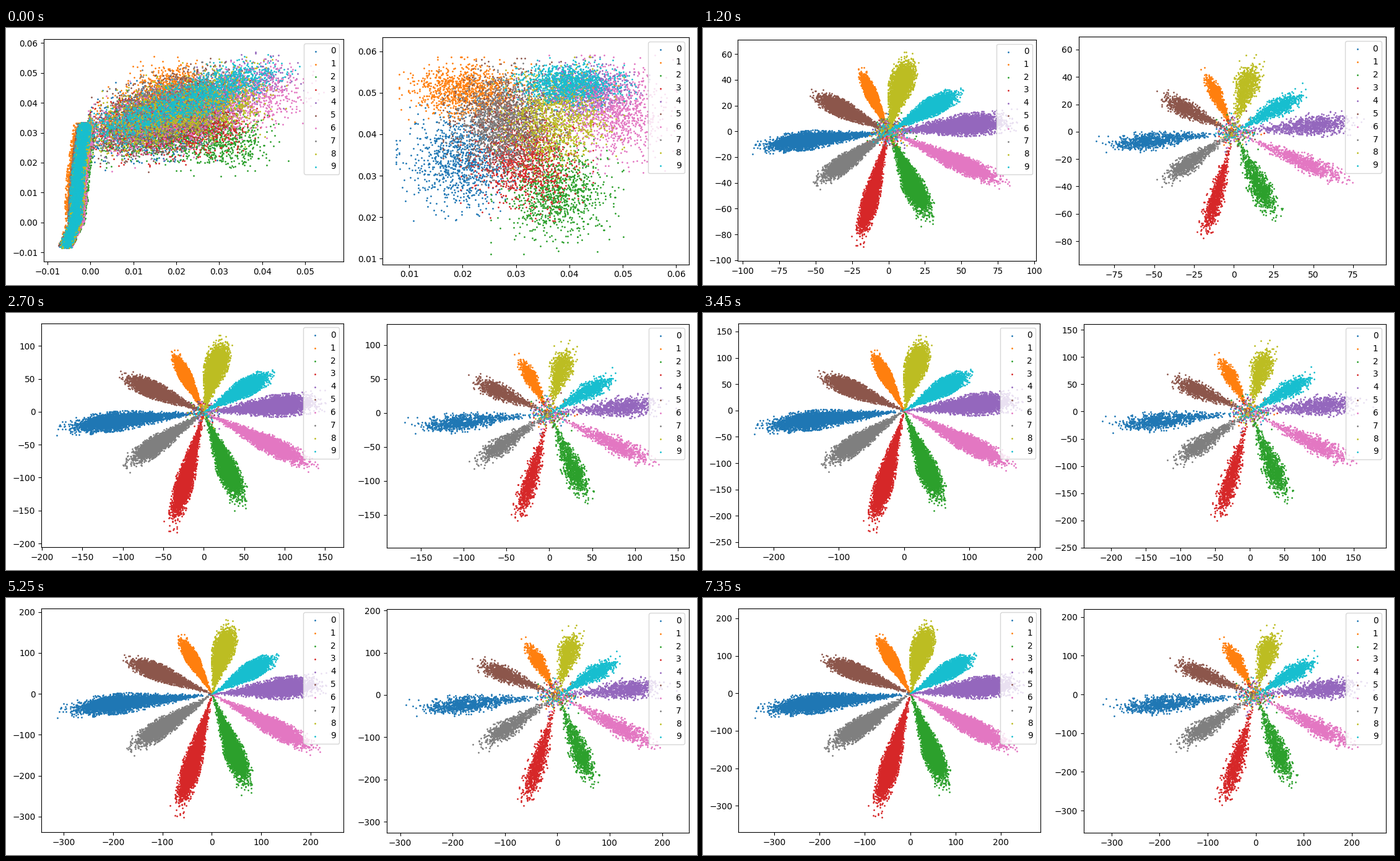
Recreate the animation shown at these times as a matplotlib script. Size 1116x416 px, loop 7.5 s.

```python
import numpy as np
import matplotlib.pyplot as plt
from matplotlib.animation import FuncAnimation

W, H, DPI = 1116, 416, 100
FRAMES, STEP = 50, 150
EM = 10 * DPI / 72

# Trained rays, one per class: end point and half width
RAYS = np.array([(-320, -40, 22), (-68, 144, 12), (76, -246, 19),
                 (-72, -303, 18), (238, 25, 24), (-184, 89, 18),
                 (218, -143, 20), (-172, -138, 20), (38, 180, 20),
                 (132, 97, 18)])

# First-epoch cluster centres, one per class
CLUSTERS = np.array([(.020, .034), (.0205, .0506), (.0377, .026),
                     (.032, .034), (.0425, .0505), (.0288, .0435),
                     (.048, .0448), (.028, .0425), (.0378, .044),
                     (.040, .0522)])

# Axis limits as rows of low and high (x, y)
TRAIN = {"first": np.array([(-.01086, -.0131), (.0589, .0613)]),
         "last": np.array([(-379, -371), (287, 227)])}
TEST = {"first": np.array([(.00502, .0086), (.0624, .0634)]),
        "last": np.array([(-358, -358), (271, 221)])}

# Growth of the features towards their last size, along x and y
GROW_AT = (0, 8, 13, 23, 30, 41, 49)
GROW_X = (.02, .272, .39, .67, .857, .974, 1)
GROW_Y = (.02, .2715, .41, .70, .862, .974, 1)


def scaled(pts, k):
    """Shrink last-epoch points to epoch k; positive sides grow earlier."""
    grow = np.array([np.interp(k, GROW_AT, g) for g in (GROW_X, GROW_Y)])
    return pts * np.where(pts < 0, grow, grow ** (.8, .89))


def text_width(text):
    em = {"\u2212": .838, ".": .318}
    return EM * sum(em.get(ch, .636) for ch in text)


def shown_ticks(axis, lo, hi):
    ticks = [t for t in axis.get_majorticklocs() if lo <= t <= hi]
    return ticks, axis.get_major_formatter().format_ticks(ticks)


class Panel:
    def __init__(self, fig, edge, middle, limits, count, seed):
        self.edge, self.middle, self.limits = edge, middle, limits
        self.train = limits is TRAIN
        self.ax = fig.add_axes([.1, .1, .3, .8])
        self.rng = np.random.default_rng(seed)
        self.count = count
        self.first = [self.cluster(c) for c in CLUSTERS]
        self.rays = [self.ray(*r) for r in RAYS]
        self.dots = [self.ax.scatter([], [], s=1, color=f"C{c}", label=str(c))
                     for c in range(10)]

    def normal(self, cut, *tail):
        return np.clip(self.rng.normal(size=(self.count, *tail)), -cut, cut)

    def cluster(self, centre):
        spread = .0046, min(.4 * (.058 - centre[1]), .0055)
        noise = self.normal(2.7, 2) * spread
        if not self.train:
            return centre + noise
        # Classes leave a narrow stem together and part on the way
        f = self.rng.beta(2.4, 1.5, (self.count, 1))
        mean = CLUSTERS.mean(axis=0)
        begin = np.array([-.001, .028])
        pts = begin + (mean + (centre - mean) * f - begin) * f + .9 * noise
        pts[:, 0] = np.where(pts[:, 0] < 0, .1 * pts[:, 0], pts[:, 0])
        stem = self.rng.random(self.count) < .62
        pts[stem] = self.stem(centre)[stem]
        return pts

    def stem(self, centre):
        y = -.0085 + .042 * self.rng.beta(1.2, 1.2, self.count)
        x = np.interp(y, (-.008, 0, .015, .033), (-.0058, -.0035, -.0029, -.0012))
        shift = .06 * (centre[0] - .034) - .05 * (centre[1] - .043)
        x += shift * np.clip((y + .008) / .015, .2, 1) + .0007 * self.normal(2.2)
        return np.column_stack([x, y])

    def ray(self, x, y, half):
        """Positions along a ray, and offsets across it."""
        z = self.normal(3.4)
        t = np.abs(.62 + np.where(z < 0, .2, .135) * z)[:, None]
        end = np.array([x, y])
        side = np.array([-y, x]) / np.hypot(x, y)
        width = half / 2.1 * np.minimum(t / .6, 1)
        across = width * self.normal(2.6, 1) * side
        pick = self.rng.random(self.count)
        return t * end, across, pick, 18 * self.normal(3, 2)

    def points(self, k):
        if k == 0:
            return self.first
        wide = 1 + 1.5 * max(0, 8 - k) / 8
        mix = (np.interp(k, (1, 8, 23), (.1, .015, 0)) if self.train
               else np.interp(k, (1, 8), (.15, .03)))
        size = 1 if self.train else .95
        return [scaled(np.where(pick[:, None] < mix, stray,
                                size * along + wide * across), k)
                for along, across, pick, stray in self.rays]

    def layout(self, low, high):
        """Fit the axes and their labels into a picture of fixed width."""
        ax = self.ax
        (x0, y0), (x1, y1) = low, high
        ax.set(xlim=(x0, x1), ylim=(y0, y1))
        label = max(map(text_width, shown_ticks(ax.yaxis, y0, y1)[1]))
        ticks, names = shown_ticks(ax.xaxis, x0, x1)
        over = text_width(names[-1]) / 2 - 496 * (x1 - ticks[-1]) / (x1 - x0)
        shift = max(0, over - 3.5)
        s = (535.3 - shift) / (505.7 + label)
        w, h = 496 * s, 368.6 * s
        left = self.edge - shift - w
        top = self.middle - 196.6 * s
        ax.set_position([left / W, 1 - (top + h) / H, w / W, h / H])
        ax.tick_params(labelsize=10 * s, length=3.5 * s, pad=3.5 * s, width=.8 * s)
        ax.legend(loc="upper right", fontsize=10 * s)

    def draw(self, k):
        for dots, pts in zip(self.dots, self.points(k)):
            dots.set_offsets(pts)
        self.layout(*(scaled(self.limits["last"], k) if k else self.limits["first"]))


fig = plt.figure(figsize=(W / DPI, H / DPI), dpi=DPI, facecolor="white")
panels = [Panel(fig, 545.1, 210.1, TRAIN, 4200, 3),
          Panel(fig, 1103, 211.1, TEST, 1000, 8)]


def update(k):
    for panel in panels:
        panel.draw(k)
    return []


anim = FuncAnimation(fig, update, frames=FRAMES, init_func=lambda: update(0),
                     interval=STEP, repeat=True, repeat_delay=0, blit=False)
plt.show()
```
